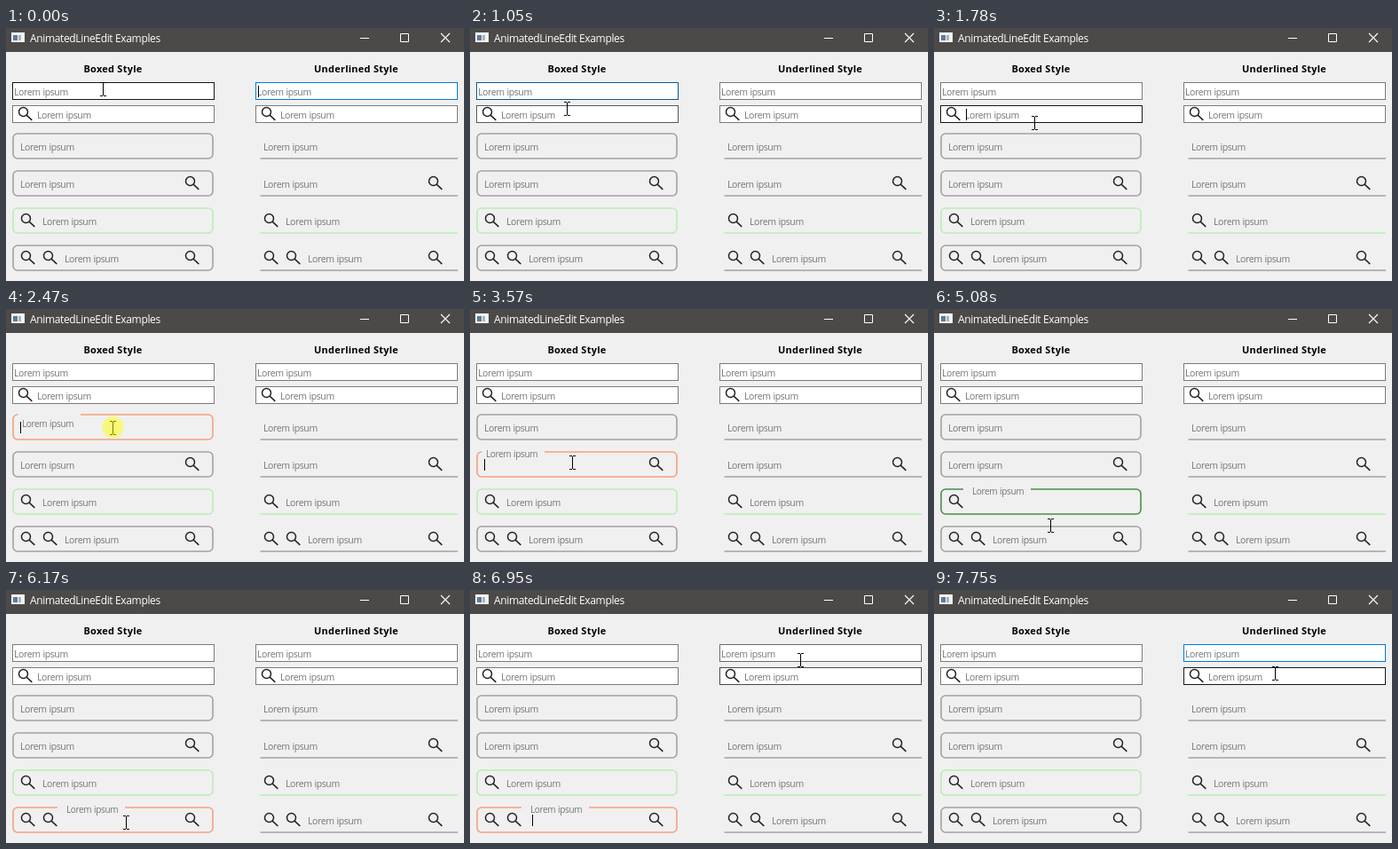
Recreate the animation shown at these times as an HTML page. Size 516 by 285 pixels, loop 8000 ms.

```html
<!DOCTYPE html>
<html>
<head>
<meta charset="utf-8">
<style>
html, body { margin: 0; width: 100%; height: 100%; overflow: hidden; background: #f0f0f0; }
svg { display: block; width: 516px; height: 285px; }
text { font-family: "Open Sans", "Noto Sans", sans-serif; font-size: 10.5px; letter-spacing: -0.4px; word-spacing: 0.6px; fill: #757575; white-space: pre; }
.title { font-size: 12px; letter-spacing: -0.35px; word-spacing: 0; fill: #fff; }
.head { font-size: 11px; font-weight: 700; letter-spacing: 0.25px; word-spacing: 0; fill: #000; text-anchor: middle; }
.small { font-size: 10px; letter-spacing: -0.35px; }
</style>
</head>
<body>
<svg id="stage" viewBox="0 0 516 285"></svg>
<script>
const LOOP = 8000, BLINK = 530, STEP = 70, COLUMN = 274;
const GRAY = [122, 122, 122], BLACK = [23, 23, 23], BLUE = [0, 120, 215];
const REST = '#a2a2a2', LIME = '#b9eeb4', ORANGE = '#f4a27e', GREEN = '#4a9046';
const stage = document.getElementById('stage');
const clamp = v => Math.max(0, Math.min(1, v));

function set(el, attrs) {
  for (const k in attrs) el.setAttribute(k, attrs[k]);
}
function add(tag, attrs, text) {
  const el = document.createElementNS('http://www.w3.org/2000/svg', tag);
  set(el, attrs);
  if (text) el.textContent = text;
  stage.appendChild(el);
  return el;
}
const rect = (x, y, width, height, more) => add('rect', { x, y, width, height, ...more });
const line = (d, stroke, more) => add('path', { d, stroke, fill: 'none', ...more });
const lorem = (x, y) => add('text', { x, y }, 'Lorem ipsum');
const show = (el, on) => set(el, { visibility: on ? 'visible' : 'hidden' });

function lens(x, y) {
  line('M11 6a5 5 0 1 1-10 0a5 5 0 1 1 10 0M9.6 9.6L15.8 15.4', '#222',
    { transform: `translate(${x - .5} ${y - .5})`, 'stroke-width': 1.5 });
}

// Window frame
rect(0, 0, 516, 285, { fill: '#f0f0f0' });
rect(0, 0, 516, 27, { fill: '#4c4a48' });
rect(6, 5, 15, 11, { fill: '#f4f4f4' });
rect(8, 8, 5, 6, { fill: '#5b7c99' });
rect(14, 8, 3, 6, { fill: '#a9b4bb' });
add('text', { x: 27, y: 16, class: 'title' }, 'AnimatedLineEdit Examples');
line('M399 11.5h10M444.5 6.5h9v9h-9z', '#fff');
line('M490 6l10 10M500 6l-10 10', '#fff', { 'stroke-width': 1.1 });
add('text', { x: 120.5, y: 50, class: 'head' }, 'Boxed Style');
add('text', { x: 394.5, y: 50, class: 'head' }, 'Underlined Style');

// Square fields, one pair per row
function plain(x, y, icon) {
  const box = rect(x + .5, y + .5, 227, 19, { fill: '#fff' });
  const textX = x + (icon ? 28 : 2);
  if (icon) lens(x + 7, y + 2);
  lorem(textX, y + 15);
  return { x, y, box, caret: [textX + 1, y + 4] };
}
const [b1, u1, b2, u2] = [0, 1].flatMap(row =>
  [0, COLUMN].map(dx => plain(7 + dx, 61 + row * 26, row === 1)));
const squares = [b1, u1, b2, u2];

// Rounded fields with their underlined twins; icons on the left push the text
function rounded(row, icons, iconRight, color, hot) {
  const y = 119 + row * 42, textX = 16 + icons * 25;
  const box = rect(8, y, 225, 28, { rx: 5, fill: 'none' });
  const from = Math.max(13.5, textX - 8);
  const gap = rect(from, y - 1.5, textX + 68 - from, 4, { fill: '#f0f0f0' });
  const label = lorem(textX, y + 19);
  line(`M286.5 ${y + 28}H509`, color, { 'stroke-width': 1.6 });
  lorem(textX + COLUMN, y + 19);
  for (const dx of [0, COLUMN]) {
    for (let i = 0; i < icons; i++) lens(17 + i * 25 + dx, y + 6);
    if (iconRight) lens(202 + dx, y + 6);
  }
  return { y, textX, color, hot, box, gap, label, caret: [textX + (icons && 4), y + 8] };
}
const rounds = [
  rounded(0, 0, false, REST, ORANGE),
  rounded(1, 0, true, REST, ORANGE),
  rounded(2, 1, false, LIME, GREEN),
  rounded(3, 2, true, REST, ORANGE)
];

const caret = rect(0, 0, 1, 13, { fill: '#000' });
const beam = line('M-4 -6.5h3M0 -6.5h3M-.5 -6v14M-4 8.5h3M0 8.5h3', '#000');
const spot = add('circle', { r: 12, fill: '#ff0', opacity: .5 });

// Each visit: field, click time, pointer place, then when it leaves and settles
const visits = [
  [u1, 0, 110, 68, 0, 1],
  [b1, 510, 110, 68, 850, 1080],
  [b2, 1480, 110, 91, 1780, 2090],
  [rounds[0], 2470, 121, 133, 2780, 3030],
  [rounds[1], 3370, 116, 172, 3900, 4120],
  [rounds[2], 4420, 126, 216, 4910, 5400],
  [rounds[3], 5530, 136, 261, 6310, 7060],
  [u1, 7060, 380, 73, 7380, 7750],
  [u2, LOOP, 385, 93, LOOP, LOOP + 1]
].map(([field, at, x, y, leave, settle]) => ({ field, at, x, y, leave, settle }));

// The pointer slows down towards its goal, moving once per step
function pointer(t) {
  const i = Math.max(0, visits.findLastIndex(v => t >= v.leave));
  const a = visits[i], b = visits[i + 1] || a;
  const count = Math.round((a.settle - a.leave) / STEP) + 1;
  const p = clamp((Math.floor((t - a.leave) / STEP) + 1) / count);
  const ease = 1 - (1 - p) ** 2;
  return [Math.round(a.x + (b.x - a.x) * ease), Math.round(a.y + (b.y - a.y) * ease)];
}

// Hover fades in and out: the share of recent moments spent over the field
function hover(field, t) {
  let n = 0;
  for (let k = 0; k < 6; k++) {
    const [x, y] = pointer(t - k * 35);
    if (x >= field.x && x <= field.x + 228 && Math.abs(y - field.y - 10) <= 11) n++;
  }
  return n / 6;
}

function drawRound(f, hot, p) {
  set(f.box, { stroke: hot ? f.hot : f.color, 'stroke-width': 1.6 });
  show(f.gap, hot);
  set(f.label, {
    x: f.textX + (p > 0 ? 2 : 0),
    y: f.y + 19 - 13.5 * p,
    class: p > 0 ? 'small' : ''
  });
}

function draw(t) {
  const i = visits.findLastIndex(v => t >= v.at);
  const { field, at } = visits[i], last = i && visits[i - 1].field;
  const since = t - at;

  for (const f of squares) {
    const base = f === field ? BLUE : GRAY, h = hover(f, t);
    set(f.box, { stroke: `rgb(${base.map((v, k) => Math.round(v + (BLACK[k] - v) * h))})` });
  }
  const rise = clamp(.38 + since / 240);
  for (const f of rounds) drawRound(f, f === field, f === field ? rise : f === last ? 1 - rise : 0);

  set(caret, { x: field.caret[0], y: field.caret[1] });
  show(caret, since % (2 * BLINK) < BLINK);

  const [x, y] = pointer(t);
  set(beam, { transform: `translate(${x} ${y})` });
  set(spot, { cx: x - .5, cy: y });
  show(spot, i > 0 && since < 130);
}

const begin = performance.now();
function tick() {
  draw((performance.now() - begin) % LOOP);
  requestAnimationFrame(tick);
}
draw(0);
tick();
</script>
</body>
</html>
```
